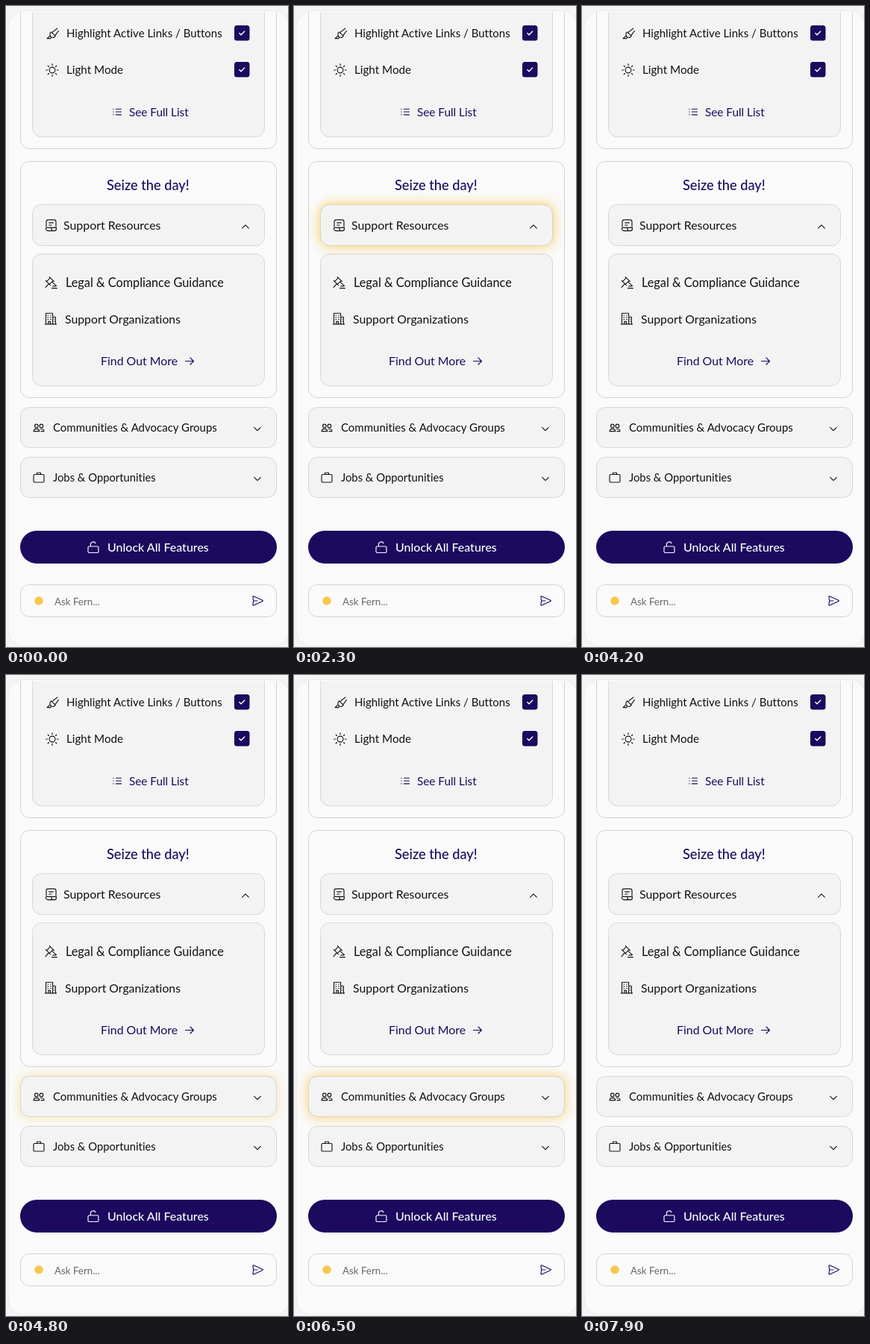
Animation of 378 by 860 pixels, one loop 8 s. Source, as an HTML page:

```html
<!DOCTYPE html>
<html lang="en">
<head>
<meta charset="utf-8">
<title>Support panel</title>
<style>
  html, body { margin: 0; width: 100%; height: 100%; overflow: hidden; background: #f5f5f5; }
  #stage { position: relative; width: 378px; height: 860px; overflow: hidden; }
  #panel { position: absolute; left: 4px; top: 7px; width: 375px; height: 851px; border-radius: 20px;
    background: #fafafa; box-shadow: 0 0 4px rgba(0, 0, 0, .06); }
  svg { position: absolute; left: 0; top: 0; }
  text { font-family: Lato, "Open Sans", sans-serif; font-variant-ligatures: none; fill: #111; }
  .navy { fill: #1b0a5e; }
  .card { fill: none; stroke: #d2d2d2; }
  .box { fill: #f3f3f3; stroke: #d8d8d8; }
  .icon { fill: none; stroke: #161616; stroke-width: 1.15; stroke-linecap: round; stroke-linejoin: round; }
  .icon.blue { stroke: #1b0a5e; }
  .icon.white { stroke: #fff; }
  .glow { position: absolute; box-sizing: border-box; border: 1px solid #e0d5b5; border-radius: 12px;
    box-shadow: 0 0 15px rgba(249, 199, 79, .9); opacity: 0; }
</style>
</head>
<body>
<div id="stage">
  <div id="panel"></div>
  <svg width="378" height="860" viewBox="0 0 378 860">
    <defs>
      <clipPath id="view"><rect x="0" y="8" width="378" height="852"/></clipPath>
      <g id="check">
        <rect width="20.5" height="20.5" rx="3.5" fill="#1b0a5e"/>
        <path d="M6.8 10.5l2.3 2.3 4.6-4.8" fill="none" stroke="#fff" stroke-width="1.4" stroke-linecap="round" stroke-linejoin="round"/>
      </g>
      <path id="chevron" d="M-4.3 -2.2L0 2.2L4.3 -2.2"/>
    </defs>

    <g clip-path="url(#view)">
      <rect class="card" x="19.5" y="-40.5" width="343" height="232" rx="12"/>
      <rect class="box" x="35.5" y="-40.5" width="311" height="216" rx="12"/>
    </g>
    <rect class="card" x="19.5" y="208.5" width="343" height="317" rx="12"/>
    <rect class="box" x="35.5" y="266.5" width="311" height="55" rx="12"/>
    <rect class="box" x="35.5" y="332.5" width="311" height="177" rx="12"/>
    <rect class="box" x="19.5" y="538.5" width="343" height="54" rx="12"/>
    <rect class="box" x="19.5" y="605.5" width="343" height="54" rx="12"/>
    <rect class="navy" x="19" y="704" width="344" height="44" rx="22"/>
    <rect class="card" x="19.5" y="776.5" width="343" height="43" rx="12"/>
    <use href="#check" x="306" y="26"/>
    <use href="#check" x="306" y="75"/>

    <!-- highlighter -->
    <path class="icon" d="M68.8 30L61.6 35.6M70.4 33.4L65.4 40.2M60.6 34.8L66.2 40.4L64 42.4L60.6 41.8L59 39.6L59 36.6ZM59.2 40L55 43.6H59.6L60.8 42"/>
    <!-- sun -->
    <g class="icon" id="sun" transform="translate(62 86)"><circle r="3.9"/></g>
    <!-- list -->
    <path class="icon blue" d="M147.5 138.2h7M147.5 142h7M147.5 145.8h7M143.8 138.2h.4M143.8 142h.4M143.8 145.8h.4"/>
    <!-- scroll -->
    <path class="icon" d="M54 296V289.4Q54 286.8 56.6 286.8H64.4Q67 286.8 67 289.4V296M57.6 290.8H63.4M57.6 294H61M60.6 297.4H54.8Q53.4 297.4 53.4 299T55.6 301.6H65Q67.4 301.6 67.4 299V297.4H60.6Q60.6 300.6 63 301.6"/>
    <!-- gavel -->
    <path class="icon" d="M58.2 363.4L64.4 369.6M53.2 368.4L59.4 374.6M59.4 364.6L54.4 369.6M63.2 368.4L58.2 373.4M61.6 370.4L67.6 375.4M57 373L53 377.6M61.4 378.6H68.4M62.8 375.8H66.6"/>
    <!-- building -->
    <g class="icon" transform="translate(52 411)">
      <path d="M1.5 15.8V1.2H10.6V15.8M10.6 6.2H14.4V15.8M.4 15.8H15.6M4.8 15.8V12.4H7.4V15.8M4 4h.6M7.6 4h.6M4 6.8h.6M7.6 6.8h.6M4 9.6h.6M7.6 9.6h.6M12.4 9h.3M12.4 12h.3"/>
    </g>
    <path class="icon blue" d="M240.5 476.5H251.5M247 472L251.5 476.5L247 481"/>
    <!-- people -->
    <g class="icon" transform="translate(44 566)">
      <circle cx="-3.2" cy="-2.6" r="2.3"/><circle cx="3.4" cy="-2.6" r="2.3"/>
      <path d="M-7 4.6Q-7 1.4-3.2 1.4T.6 4.6ZM2.6 1.5Q7 1.2 7 4.6H3"/>
    </g>
    <!-- briefcase -->
    <path class="icon" d="M38.2 628.5H49.8Q51 628.5 51 629.7V637.8Q51 639 49.8 639H38.2Q37 639 37 637.8V629.7Q37 628.5 38.2 628.5ZM41.5 628.3V626.2H46.5V628.3"/>
    <!-- open lock -->
    <path class="icon white" d="M111.6 725H122.4Q124 725 124 726.6V732Q124 733.5 122.4 733.5H111.6Q110 733.5 110 732V726.6Q110 725 111.6 725ZM113.4 725V722.2A3.5 3.5 0 0 1 120 720.8"/>
    <!-- send -->
    <path class="icon blue" d="M331 793.2Q330.7 791.5 332.2 792.1L343.6 797.2Q345 798 343.6 798.8L332.2 803.9Q330.7 804.5 331 802.8L331.7 798ZM331.7 798H337"/>
    <circle cx="44" cy="798" r="5.8" fill="#f9c74f"/>

    <g class="icon">
      <use href="#chevron" transform="translate(321 296) scale(1 -1)"/>
      <use href="#chevron" x="337" y="567.5"/>
      <use href="#chevron" x="337" y="634.5"/>
    </g>
    <g id="labels"></g>
  </svg>
</div>
<script>
  const NS = "http://www.w3.org/2000/svg";
  const LOOP = 8000, FADE = 900;

  function add(parent, tag, attrs, content = "") {
    const el = document.createElementNS(NS, tag);
    for (const key in attrs) el.setAttribute(key, attrs[key]);
    el.textContent = content;
    parent.append(el);
  }

  const sun = document.getElementById("sun");
  for (let a = 0; a < 360; a += 45)
    add(sun, "path", { d: "M0 -6.4V-8.3", transform: `rotate(${a})` });

  // text, x, baseline, size, extra attributes
  const navy = { class: "navy" };
  const labels = [
    ["Highlight Active Links / Buttons", 81, 42, 15],
    ["Light Mode", 81, 91, 15.2],
    ["See Full List", 165, 147.5, 15.3, navy],
    ["Seize the day!", 135, 247, 18.2, { class: "navy", "font-weight": 500 }],
    ["Support Resources", 77, 300, 15.9],
    ["Legal & Compliance Guidance", 80, 376.5, 16.3],
    ["Support Organizations", 79, 425.5, 15.8],
    ["Find Out More", 127, 482, 15.9, navy],
    ["Communities & Advocacy Groups", 63, 571, 15],
    ["Jobs & Opportunities", 63, 638, 14.8],
    ["Unlock All Features", 136, 732, 16, { "font-weight": 500, style: "fill:#fff" }],
    ["Ask Fern...", 65, 803.5, 13.3, { style: "fill:#686868" }]
  ];
  const layer = document.getElementById("labels");
  for (const [text, x, y, size, extra] of labels)
    add(layer, "text", { x, y, "font-size": size, ...extra }, text);

  // row geometry, fade-in start, fade-out start
  const glows = [
    { left: 35, top: 266, width: 312, height: 56, on: 900, off: 2700 },
    { left: 19, top: 538, width: 344, height: 55, on: 4500, off: 6300 }
  ];
  for (const { on, off, ...box } of glows) {
    const el = document.createElement("div");
    el.className = "glow";
    for (const side in box) el.style[side] = box[side] + "px";
    document.getElementById("stage").append(el);
    const steps = [
      [0, 0], [on, 0, "ease-out"], [on + FADE, 1],
      [off, 1, "ease-in-out"], [off + FADE, 0], [LOOP, 0]
    ];
    el.animate(
      steps.map(([t, opacity, easing = "linear"]) => ({ offset: t / LOOP, opacity, easing })),
      { duration: LOOP, iterations: Infinity }
    );
  }
</script>
</body>
</html>
```
